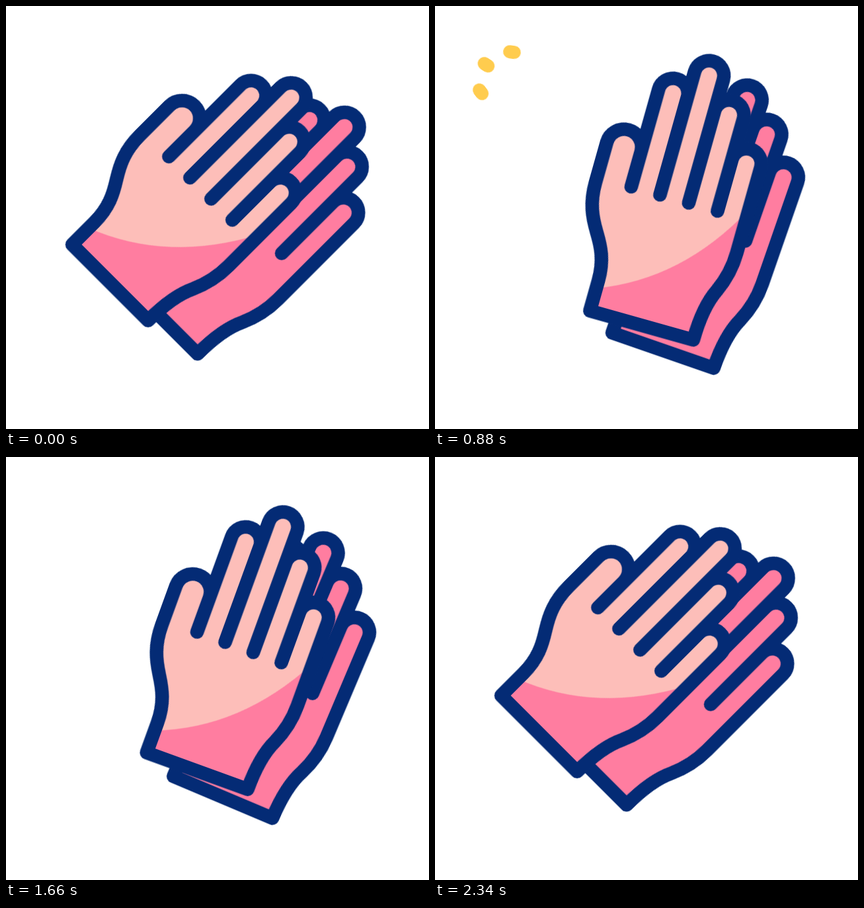
Write an HTML page without scripts that moves like this. It is 640 px wide and 640 px high and loops after 2400 ms.

```html
<!DOCTYPE html>
<html lang="en">
<head>
<meta charset="utf-8">
<title>Hands</title>
<style>
  html, body { margin: 0; width: 100%; height: 100%; overflow: hidden; background: #fff; }
  svg { display: block; width: 100%; height: 100%; }

  .outline { fill: none; stroke: #042b75; stroke-width: 20.6; stroke-linejoin: round; }
  .skin { fill: #fdbeb9; }
  .shade { fill: #ff7da0; }

  .hand { animation: swing 2400ms cubic-bezier(.76, 0, .24, 1) infinite; }
  .front {
    --rest: translate(234.8px, 362.4px) rotate(45deg);
    --raised: translate(361px, 399px) rotate(13.6deg);
  }
  .back {
    --rest: translate(284.5px, 381px) rotate(45deg);
    --raised: translate(358.4px, 422.1px) rotate(17.3deg);
  }
  @keyframes swing {
    0%, 97.1%, 100% { transform: var(--rest); }
    50.6% { transform: var(--raised); }
  }

  .rays path {
    stroke: #ffcc4e; stroke-width: 20; stroke-linecap: round;
    animation: shoot 2400ms linear infinite, blink 2400ms step-end infinite;
  }
  @keyframes shoot {
    0%, 35.8% { stroke-dasharray: 0 200; stroke-dashoffset: 0; }
    36.67% { stroke-dasharray: 6.5 200; stroke-dashoffset: 0; }
    40.8% { stroke-dasharray: 40 200; stroke-dashoffset: -8; }
    45% { stroke-dasharray: 25 200; stroke-dashoffset: -46; }
    49.2%, 100% { stroke-dasharray: 0 200; stroke-dashoffset: -71; }
  }
  @keyframes blink {
    0%, 49.2% { opacity: 0; }
    35.9% { opacity: 1; }
  }
</style>
</head>
<body>
<svg viewBox="0 0 640 640">
  <defs>
    <path id="front-shape" d="M-39.6 334.6V287C-39.6 255 -50 236 -62 217S-84 178 -84 145
      V82a26.9 26.9 0 0 1 53.8 0V137
      V-16.4a22.6 22.6 0 0 1 45.2 0V137
      V-56.8a22.6 22.6 0 0 1 45.2 0V137
      V-7.6a22.6 22.6 0 0 1 45.2 0V137
      V56a22.6 22.6 0 0 1 45.2 0V190
      C150.6 215 145 235 137 253C126 276 123 310 123 334.6Z"/>
  </defs>

  <!-- Both hands are drawn upright; the inner shift puts the pivot in the palm. -->
  <g class="hand back">
    <path class="outline" style="fill: #ff7da0" transform="translate(-16.4 -235.6)"
      d="M-39.6 334.6V287C-39.6 255 -50 236 -62 217S-84 178 -84 145
      V82a26.9 26.9 0 0 1 53.8 0V137
      V-35a22.6 22.6 0 0 1 45.2 0V137
      V-65a22.6 22.6 0 0 1 45.2 0V137
      V-25.7a22.6 22.6 0 0 1 45.2 0V137
      V27.3a22.6 22.6 0 0 1 45.2 0V190
      C150.6 215 145 235 137 253C126 276 123 310 123 334.6Z"/>
  </g>

  <g class="hand front">
    <g transform="translate(-56.7 -240.3)">
      <use href="#front-shape" class="skin"/>
      <path class="shade" d="M-39.6 299Q82 252 150.6 122V190C150.6 215 145 235 137 253C126 276 123 310 123 334.6H-39.6Z"/>
      <use href="#front-shape" class="outline"/>
    </g>
  </g>

  <g class="rays" fill="none">
    <path d="M0 0H72" transform="translate(113 69.2) rotate(8)"/>
    <path d="M0 0H72" transform="translate(74.5 87) rotate(33)"/>
    <path d="M0 0H72" transform="translate(67 127) rotate(53)"/>
  </g>
</svg>
</body>
</html>
```
